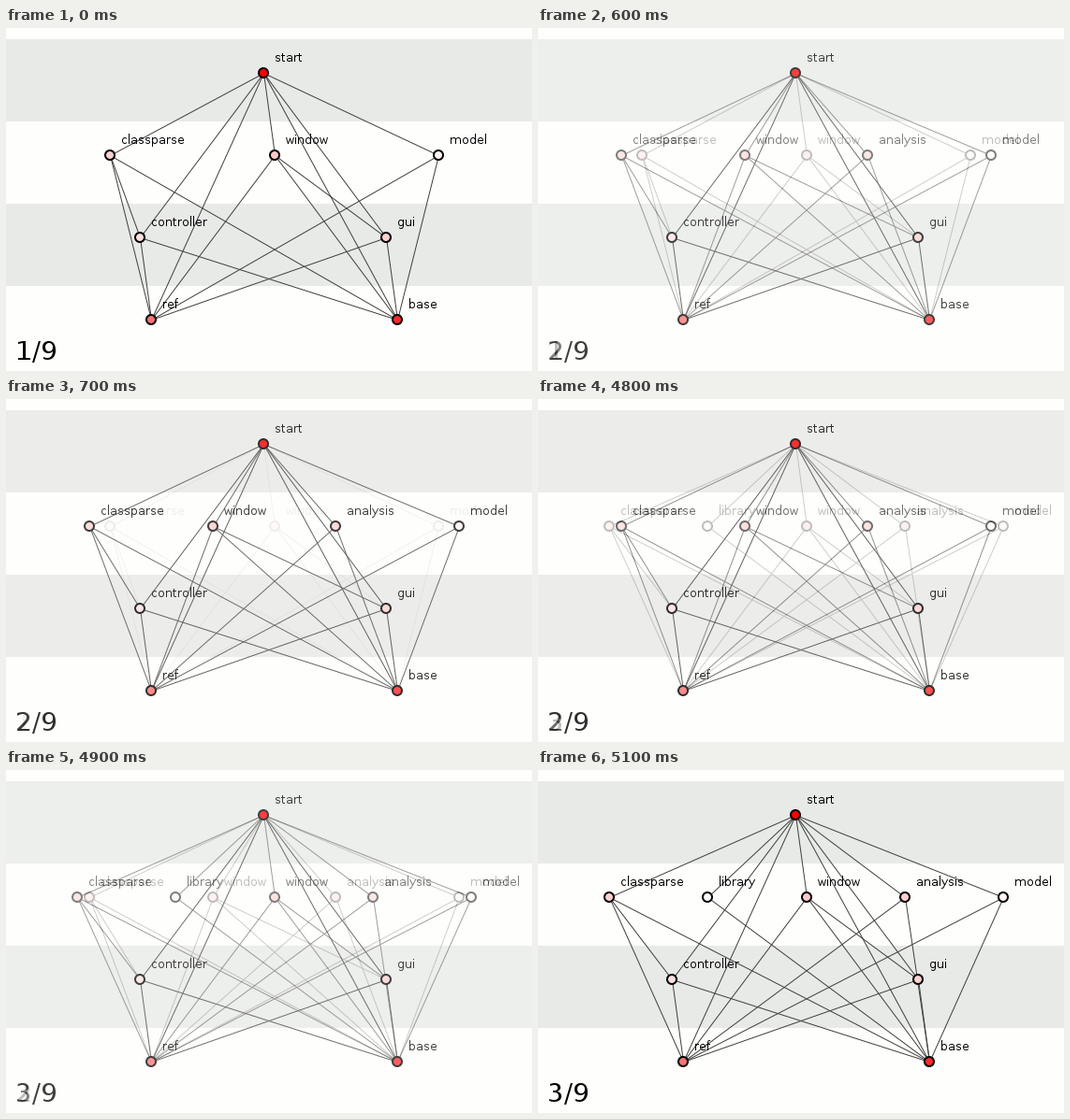
These frames come from a looping animation (562 px wide and 367 px high, 8 s). A matplotlib script:

```python
import math

import matplotlib.pyplot as plt
import numpy as np
from matplotlib.animation import FuncAnimation
from matplotlib.patches import Circle, Rectangle

W, H, DPI = 562, 367, 100
PX = 72 / DPI  # points per pixel
STEP_MS, FRAMES = 100, 80
FADE_STEPS = 4
FADE_STARTS = (5, 48)

BACKGROUND, BAND, EDGE = "#fefefc", "#e8eae7", "#404040"
LEFT, SPAN, TOP, LEVEL = 23.25, 526.5, 48, 88

# Whole-pixel glyph hinting gives the crisp, evenly spaced labels.
plt.rcParams.update({
    "font.family": "DejaVu Sans",
    "text.hinting": "native",
    "text.hinting_factor": 1,
})

MIDDLE_ROWS = (
    ("classparse", "window", "model"),
    ("classparse", "window", "analysis", "model"),
    ("classparse", "library", "window", "analysis", "model"),
)
LINKS = {
    "classparse": ("controller", "ref", "base"),
    "library": ("base",),
    "window": ("ref", "gui", "base"),
    "analysis": ("ref", "base"),
    "model": ("ref", "base"),
    "controller": ("ref", "base"),
    "gui": ("ref", "base"),
}
FILLS = {
    "start": "#ff0000",
    "classparse": "#ffd0d0",
    "library": "#ffffff",
    "window": "#ffc8c8",
    "analysis": "#ffd0d0",
    "model": "#fff4f4",
    "controller": "#ffe0e0",
    "gui": "#ffd0d0",
    "ref": "#ff7272",
    "base": "#ff2a2a",
}


def layout(middle):
    """Spread each row evenly; every other row is shifted to the left."""
    rows = (("start",), middle, ("controller", "gui"), ("ref", "base"))
    places = {}
    for level, row in enumerate(rows):
        shift = -12 if level in (0, 2) else 0
        for i, name in enumerate(row):
            x = LEFT + (i + 0.5) * SPAN / len(row) + shift
            places[name] = (math.floor(x + 0.5), TOP + level * LEVEL)
    return places


def draw_link(ax, start, end):
    """Join two nodes through the centres of their pixels."""
    xs, ys = np.transpose([start, end]) + 0.5
    ax.plot(xs, ys, color=EDGE, lw=PX, zorder=1)


def draw_graph(ax, page, middle):
    ax.set(xlim=(0, W), ylim=(H, 0))
    ax.axis("off")
    for y in (12, 188):
        ax.add_patch(Rectangle((0, y), W, LEVEL, color=BAND, lw=0, zorder=0))

    places = layout(middle)
    links = {**LINKS, "start": [name for name in places if name != "start"]}
    for name, (x, y) in places.items():
        for other in links.get(name, ()):
            if other in places:
                draw_link(ax, (x, y), places[other])
        ax.add_patch(Circle((x, y), 5, fc=FILLS[name], ec="black",
                            lw=2 * PX, zorder=2))
        ax.text(x + 12, y - 12, name, size=13 * PX, va="baseline", zorder=3)
    ax.text(10, 355, f"{page}/9", size=28 * PX, va="baseline", zorder=3)


def render(page, middle):
    ax = fig.add_axes([0, 0, 1, 1])
    draw_graph(ax, page, middle)
    fig.canvas.draw()
    pixels = np.asarray(fig.canvas.buffer_rgba())[..., :3] / 255
    ax.remove()
    return pixels


def compose(frame):
    """Fade the old page out to the background, with the new one over it."""
    page = 0
    for start in FADE_STARTS:
        step = frame - start + 1
        if 0 < step < FADE_STEPS:
            t = step / FADE_STEPS
            faded = (1 - t) * pages[page] + t * blank
            return (1 - t) * faded + t * pages[page + 1]
        if step >= FADE_STEPS:
            page += 1
    return pages[page]


def update(frame):
    picture.set_data(compose(frame))
    return (picture,)


fig = plt.figure(figsize=(W / DPI, H / DPI), dpi=DPI, facecolor=BACKGROUND)
pages = [render(i, row) for i, row in enumerate(MIDDLE_ROWS, 1)]
blank = np.array([int(BACKGROUND[i:i + 2], 16) / 255 for i in (1, 3, 5)])
picture = fig.figimage(pages[0], origin="upper")

animation = FuncAnimation(fig, update, frames=FRAMES, interval=STEP_MS,
                          repeat=True, repeat_delay=0, blit=False)
plt.show()
```
